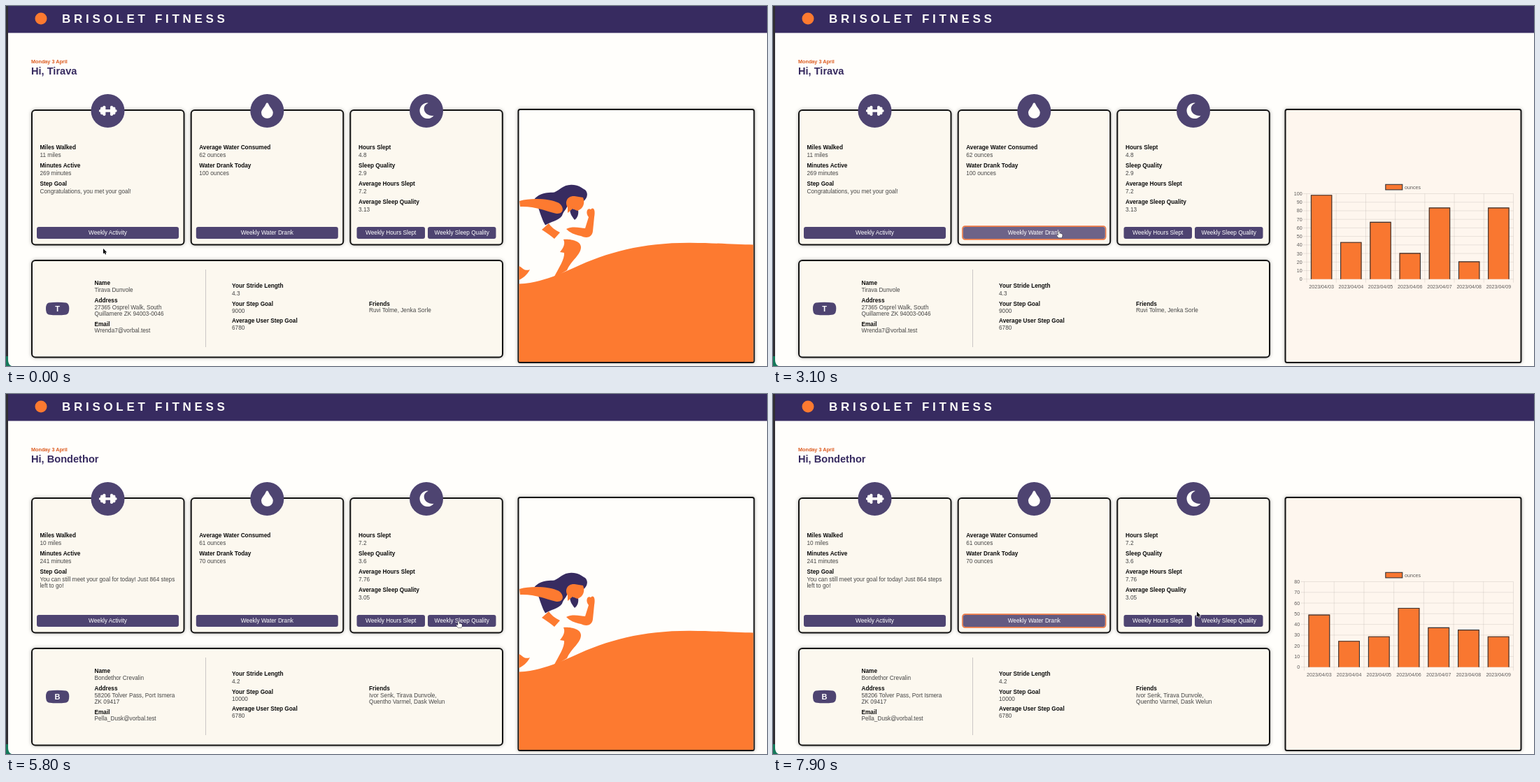
Animation, 1088 px wide and 515 px high, one loop 8000 ms. Source, as an HTML page with a canvas:

```html
<!DOCTYPE html>
<html lang="en">
<head>
<meta charset="utf-8">
<title>Fitness dashboard</title>
<style>
  html, body { margin: 0; width: 100%; height: 100%; overflow: hidden; background: #fffefb; }
  svg, canvas { position: absolute; left: 0; top: 0; width: 1088px; height: 515px; }
  text { font: 8.25px "Liberation Sans", Arial, sans-serif; fill: #454545; }
  .head { font-weight: bold; fill: #0c0c0c; }
  .button { fill: #fff; text-anchor: middle; }
  .title { font-size: 17px; font-weight: bold; fill: #fffefb; letter-spacing: 4.7px; }
  .date { font-size: 7.25px; font-weight: bold; fill: #dc5a1e; }
  .hello { font-size: 14.6px; font-weight: bold; fill: #372b60; }
  .initial { font-size: 11px; font-weight: bold; fill: #fff; text-anchor: middle; }
  .card { fill: #fcf8ef; stroke: #121212; stroke-width: 2; filter: drop-shadow(0 0 2.5px rgba(0,0,0,.3)); }
  .skin { fill: #fd7a30; }
  .hair { fill: #372b60; }
  .icon { fill: #fffefb; }
</style>
</head>
<body>
<svg id="page" viewBox="0 0 1088 515">
  <rect width="1088" height="515" fill="#302e33"/>
  <rect y="501" width="8" height="14" fill="#14795a"/>
  <path d="M3 0H1088V515H8Q3 513 3 506Z" fill="#fffefb"/>
  <rect x="3" width="1085" height="38.5" fill="#372b60"/>
  <circle cx="50" cy="18" r="8.5" fill="#fd7a30"/>

  <rect class="card" x="37" y="149" width="217.5" height="192.5" rx="5"/>
  <rect class="card" x="264.7" y="149" width="217.5" height="192.5" rx="5"/>
  <rect class="card" x="492.3" y="149" width="217.5" height="192.5" rx="5"/>
  <rect class="card" x="37" y="364" width="673" height="138.5" rx="5"/>
  <rect class="card" id="panel" x="732.5" y="148" width="337" height="362" rx="2.5"/>
  <path d="M285.5 377V488" stroke="#cbc7c6"/>
  <path d="M61 424.5Q73.5 422.8 86 424.5Q90.3 425.5 90.3 433Q90.3 440.5 86 441.5Q73.5 443.2 61 441.5Q57 440.5 57 433Q57 425.5 61 424.5Z" fill="#4e4471"/>

  <g fill="#4e4471">
    <circle cx="145.5" cy="150" r="24"/>
    <circle cx="373.3" cy="150" r="24"/>
    <circle cx="601" cy="150" r="24"/>
  </g>
  <g class="icon">
    <rect x="133" y="148" width="25.5" height="3.8" rx="1.6"/>
    <rect x="135" y="144.5" width="4.6" height="10.8" rx="1.7"/>
    <rect x="138.4" y="142.8" width="4" height="14.2" rx="1.7"/>
    <rect x="149" y="142.8" width="4" height="14.2" rx="1.7"/>
    <rect x="151.8" y="144.5" width="4.6" height="10.8" rx="1.7"/>
    <path d="M373.4 138.5C375 138.5 375.3 140.5 376.3 142.3C378.5 146.3 381.8 149 381.8 152.8A8.4 8 0 0 1 365 152.8C365 149 368.3 146.3 370.5 142.3C371.5 140.5 371.8 138.5 373.4 138.5Z"/>
    <path d="M602 138.5A11.3 11.3 0 1 0 611.6 156.8C605 158 597.7 153.5 597.7 147C597.7 143 600 140.5 603.8 138.8Z"/>
  </g>

  <g id="runner">
    <path class="skin" d="M733.5 397.5C765 396 790 384 812 374.5C860 352 910 338.5 978 338.7C1020 339 1045 341.5 1068.5 341.5V509H733.5Z"/>
    <path class="hair" d="M755 277C762 267 775 267 784 266.5C792 263 796 256 808 255.7C818 255.5 823 260 828 263C833 268 831 275 826 279C817 270 807 274 803 285C801 292 797 293 795 300C790 307 778 309 771 313.5C764 302 762 286 755 277Z"/>
    <path class="hair" d="M806 289L818 292C819 298 817 303 813 306C809 301 806 297 806 289Z"/>
    <path class="skin" d="M803 288C798 280 803 271 813 272L825 274C828 281 826 290 817 293L810 290L803 296Z"/>
    <path class="skin" d="M734 279C755 273 784 277 792 283C799 290 796 298 787 297C772 294 757 286 735 287Z"/>
    <path class="skin" d="M766 320L776 311Q780 318 792 324L784 333Q777 327 766 320Z"/>
    <path class="skin" d="M801 319C811 314 822 318 828 318L833 302C828 296 831 288 836 291C840 287 843 292 841 302L839 322C838 331 830 333 822 329C812 327 806 324 801 319Z"/>
    <path class="skin" d="M797 334C807 333 822 336 822 345C822 356 808 364 802 378L783 389C790 375 799 362 798 353L792 352C797 346 800 340 797 334Z"/>
    <path class="skin" d="M733.5 372C738 374 741 380 749 377C746 384 738 390 733.5 392Z"/>
  </g>
</svg>
<canvas id="chart"></canvas>
<script>
const LOOP = 8000, RELOAD = 5600, FADE = 280;
const page = document.getElementById('page');
const panel = document.getElementById('panel');
const runner = document.getElementById('runner');
const canvas = document.getElementById('chart');
const ctx = canvas.getContext('2d');
const dpr = window.devicePixelRatio || 1;
canvas.width = 1088 * dpr;
canvas.height = 515 * dpr;

const clamp = v => Math.min(1, Math.max(0, v));
const smooth = v => v * v * (3 - 2 * v);
const outQuart = v => 1 - (1 - clamp(v)) ** 4;

function add(parent, tag, attrs, content) {
  const el = document.createElementNS('http://www.w3.org/2000/svg', tag);
  for (const key in attrs) el.setAttribute(key, attrs[key]);
  if (content) el.textContent = content;
  return parent.appendChild(el);
}
const text = (parent, x, y, content, cls = '') => add(parent, 'text', { x, y, class: cls }, content);

// Buttons: box, label, hover and focus spans in ms
const buttons = [
  { x: 44, w: 203, label: 'Weekly Activity', hover: [[550, 2000], [6690, 6900]], focus: [[960, 2450]] },
  { x: 271.8, w: 203, label: 'Weekly Water Drank', hover: [[2030, 3225], [7010, 7800]], focus: [[2450, 3650], [7640, 9000]] },
  { x: 501.5, w: 97.5, label: 'Weekly Hours Slept', hover: [[3260, 3980]], focus: [[3650, 4560]] },
  { x: 603, w: 97.5, label: 'Weekly Sleep Quality', hover: [[3990, RELOAD]], focus: [[4560, RELOAD]] }
];
const BTN_Y = 316, BTN_H = 17;
for (const b of buttons) {
  b.ring = add(page, 'rect', { x: b.x - .8, y: BTN_Y - .8, width: b.w + 1.6, height: BTN_H + 1.6, rx: 3.5, fill: 'none', stroke: '#ee7a45', 'stroke-width': 1.7 });
  b.box = add(page, 'rect', { x: b.x, y: BTN_Y, width: b.w, height: BTN_H, rx: 3, fill: '#4e4471' });
  text(page, b.x + b.w / 2, 327.4, b.label, 'button');
}

// Texts shared by both users
text(page, 80, 23.7, 'BRISOLET FITNESS', 'title');
text(page, 36, 82, 'Monday 3 April', 'date');
const ROWS = [205.3, 231.2, 257, 283];
const heads = (x, ys, names) => names.forEach((name, i) => text(page, x, ys[i], name, 'head'));
heads(48.5, ROWS, ['Miles Walked', 'Minutes Active', 'Step Goal']);
heads(276.2, ROWS, ['Average Water Consumed', 'Water Drank Today']);
heads(504, ROWS, ['Hours Slept', 'Sleep Quality', 'Average Hours Slept', 'Average Sleep Quality']);
heads(126.5, [398.7, 424, 457.7], ['Name', 'Address', 'Email']);
heads(323, [403.3, 428.6, 453.3], ['Your Stride Length', 'Your Step Goal', 'Average User Step Goal']);

function userTexts(u) {
  const g = add(page, 'g', {});
  const values = (x, list) => list.forEach((v, i) => text(g, x, ROWS[i] + 10.6, v));
  text(g, 36, 97.7, 'Hi, ' + u.name.split(' ')[0], 'hello');
  text(g, 73.6, 437, u.name[0], 'initial');
  values(48.5, [u.miles, u.minutes, u.goal[0]]);
  if (u.goal[1]) text(g, 48.5, 277.2, u.goal[1]);
  values(276.2, u.water);
  values(504, u.sleep);
  text(g, 126.5, 409.1, u.name);
  u.address.forEach((line, i) => text(g, 126.5, 433.8 + 9.2 * i, line));
  text(g, 126.5, 467.4, u.email);
  [u.stride, u.steps, '6780'].forEach((v, i) => text(g, 323, 413.6 + 24.9 * i, v));
  const top = u.friends.length > 1 ? 424 : 428.6;
  text(g, 519, top, 'Friends', 'head');
  u.friends.forEach((line, i) => text(g, 519, top + 9.8 + 9.2 * i, line));
  return g;
}
const firstUser = userTexts({
  name: 'Tirava Dunvole', miles: '11 miles', minutes: '269 minutes',
  goal: ['Congratulations, you met your goal!'],
  water: ['62 ounces', '100 ounces'], sleep: ['4.8', '2.9', '7.2', '3.13'],
  address: ['27365 Osprel Walk, South', 'Quillamere ZK 94003-0046'],
  email: 'Wrenda7@vorbal.test', stride: '4.3', steps: '9000',
  friends: ['Ruvi Tolme, Jenka Sorle']
});
const secondUser = userTexts({
  name: 'Bondethor Crevalin', miles: '10 miles', minutes: '241 minutes',
  goal: ['You can still meet your goal for today! Just 864 steps', 'left to go!'],
  water: ['61 ounces', '70 ounces'], sleep: ['7.2', '3.6', '7.76', '3.05'],
  address: ['58206 Tolver Pass, Port Ismera', 'ZK 09417'],
  email: 'Pella_Dusk@vorbal.test', stride: '4.2', steps: '10000',
  friends: ['Ivor Senk, Tirava Dunvole,', 'Quentho Varmel, Dask Welun']
});

// Charts
const charts = [
  { from: 960, to: 2450, label: 'minutes', left: 763, min: 0, max: 300, step: 50, day: 3, data: [269, 118, 198, 63, 204, 231, 259] },
  { from: 2450, to: 3650, label: 'ounces', left: 763, min: 0, max: 100, step: 10, day: 3, data: [100, 44, 68, 31, 85, 21, 85] },
  { from: 3650, to: 4560, label: 'Hours Slept', left: 762.8, right: 1039, line: true, min: 4.5, max: 9.5, step: .5, day: 4, data: [4.59, 5.83, 9.3, 8.53, 5.83, 6.98] },
  { from: 4560, to: RELOAD, label: 'Sleep Quality', left: 760.9, min: 0, max: 5, step: .5, day: 4, data: [4.29, 3.53, 3.44, 3.16, 4.56, 1.48] },
  { from: 7640, to: LOOP, label: 'ounces', left: 759.5, min: 0, max: 80, step: 10, day: 3, data: [70, 35, 41, 79, 53, 50, 41] }
];
const TOP = 268.5, BASE = 390.7, RIGHT = 1058.5;
const ORANGE = '#f97730', INK = '#333336';

function segment(x1, y1, x2, y2) {
  ctx.beginPath();
  ctx.moveTo(x1, y1);
  ctx.lineTo(x2, y2);
  ctx.stroke();
}

function drawChart(c, t) {
  const grow = outQuart((t - c.from) / 1000);
  const right = c.right || RIGHT, n = c.data.length;
  const slot = (right - c.left) / (c.line ? n - 1 : n);
  const yOf = v => BASE - (v - c.min) / (c.max - c.min) * (BASE - TOP);
  const center = i => c.left + slot * (c.line ? i : i + .5);

  ctx.font = '7.1px "Liberation Sans", Arial, sans-serif';
  ctx.lineWidth = .8;
  ctx.strokeStyle = 'rgba(0,0,0,.11)';
  ctx.fillStyle = '#5d5b5a';
  ctx.textAlign = 'right';
  const ticks = Math.round((c.max - c.min) / c.step);
  for (let i = 0; i <= ticks; i++) {
    const v = c.min + i * c.step, y = yOf(v);
    segment(c.left - 5, y, right, y);
    ctx.fillText(c.step < 1 && v ? v.toFixed(1) : v, c.left - 6.3, y + 2.5);
  }
  ctx.textAlign = 'center';
  for (let i = 0; i < n + (c.line ? 0 : 1); i++) {
    segment(c.left + slot * i, TOP, c.left + slot * i, BASE + 5);
  }
  for (let i = 0; i < n; i++) ctx.fillText('2023/04/0' + (c.day + i), center(i), 403.7);

  ctx.textAlign = 'left';
  const legendX = 901 - (27.5 + ctx.measureText(c.label).width) / 2;
  ctx.fillText(c.label, legendX + 27.3, 261.7);
  ctx.fillStyle = c.line ? '#e8693a' : ORANGE;
  ctx.strokeStyle = INK;
  ctx.lineWidth = 1.1;
  ctx.fillRect(legendX, 255.3, 24, 7.6);
  ctx.strokeRect(legendX, 255.3, 24, 7.6);

  const tops = c.data.map(v => BASE - (BASE - yOf(v)) * grow);
  if (c.line) drawLine(tops, center);
  else tops.forEach((y, i) => drawBar(center(i), slot * .72, y));
}

function drawBar(x, w, y) {
  const l = x - w / 2;
  ctx.fillStyle = ORANGE;
  ctx.fillRect(l, y, w, BASE - y);
  ctx.beginPath();
  ctx.moveTo(l + .5, BASE);
  ctx.lineTo(l + .5, y + .5);
  ctx.lineTo(l + w - .5, y + .5);
  ctx.lineTo(l + w - .5, BASE);
  ctx.stroke();
}

function drawLine(tops, center) {
  ctx.strokeStyle = '#000';
  ctx.lineWidth = 1.3;
  ctx.beginPath();
  tops.forEach((y, i) => ctx.lineTo(center(i), y));
  ctx.stroke();
  ctx.fillStyle = '#e8593a';
  ctx.lineWidth = 1;
  tops.forEach((y, i) => {
    ctx.beginPath();
    ctx.arc(center(i), y, 1.9, 0, 7);
    ctx.fill();
    ctx.stroke();
  });
}

// Pointer: time, x, y of its hot spot
const route = [
  [0, 139, 347], [300, 139, 347], [750, 158, 324], [1850, 158, 324], [2200, 400, 322.5],
  [3050, 400, 322.5], [3400, 552, 324], [3900, 552, 324], [4100, 654.5, 321.5],
  [4400, 652, 324.5], [5450, 652, 324.5], [5700, 647, 325.5], [6350, 647, 325.5],
  [6550, 430, 346], [6750, 205, 326], [6820, 205, 326], [7100, 438, 326],
  [7660, 438, 326], [7900, 606, 311.5], [LOOP, 606, 311.5]
];
const arrow = new Path2D('M0 0V7.4L1.7 5.9L2.9 8.6L4.2 8L3 5.4H5.3Z');
const hand = new Path2D('M-.8 .3Q0-.7 .8 .3V3.2Q2-.2+2 3.2Q3.2 2.2 3.4 3.6Q4.8 2.9 4.9 4.4V6.2Q4.8 7.6 4 9H-.4Q-1.6 7.4-3.2 5.6Q-3-.0-.8 5.4Z'.replace('2-.2+2', '1.9 2.2 2').replace('-3-.0-.8', '-2.8 4.2-.8'));

function drawPointer(t) {
  const i = route.findIndex(p => p[0] > t);
  const [t0, x0, y0] = route[i - 1], [t1, x1, y1] = route[i];
  const k = smooth((t - t0) / (t1 - t0));
  const x = x0 + (x1 - x0) * k, y = y0 + (y1 - y0) * k;
  const over = y >= BTN_Y && y <= BTN_Y + BTN_H && buttons.some(b => x >= b.x && x <= b.x + b.w);
  const shape = over ? hand : arrow;
  ctx.save();
  ctx.translate(x, y);
  ctx.lineJoin = 'round';
  ctx.lineWidth = over ? .9 : 1.3;
  ctx.strokeStyle = over ? '#16141c' : '#fff';
  ctx.fillStyle = over ? '#fff' : '#000';
  ctx.stroke(shape);
  ctx.fill(shape);
  ctx.restore();
}

// Eased state of a set of on/off spans; a reload clears it at once
function level(spans, t, fade) {
  let best = 0;
  for (const [on, off] of spans) {
    const rise = clamp((t - on) / fade);
    const fall = off === RELOAD ? +(t < RELOAD) : 1 - clamp((t - off) / fade);
    best = Math.max(best, Math.min(rise, fall));
  }
  return smooth(best);
}

function mix(a, b, k) {
  return `rgb(${a.map((v, i) => Math.round(v + (b[i] - v) * k))})`;
}

function draw(t) {
  for (const b of buttons) {
    b.box.setAttribute('fill', mix([78, 68, 113], [109, 99, 136], level(b.hover, t, FADE)));
    b.ring.setAttribute('opacity', level(b.focus, t, 200));
  }
  const reloaded = t >= RELOAD;
  firstUser.style.display = reloaded ? 'none' : '';
  secondUser.style.display = reloaded ? '' : 'none';

  const chart = charts.find(c => t >= c.from && t < c.to);
  runner.style.display = chart ? 'none' : '';
  panel.style.fill = chart ? '#fef6ee' : '#fffefb';

  ctx.setTransform(dpr, 0, 0, dpr, 0, 0);
  ctx.clearRect(0, 0, 1088, 515);
  if (chart) drawChart(chart, t);
  drawPointer(t);
}

const start = performance.now();
function tick() {
  draw((performance.now() - start) % LOOP);
  requestAnimationFrame(tick);
}
tick();
</script>
</body>
</html>
```
